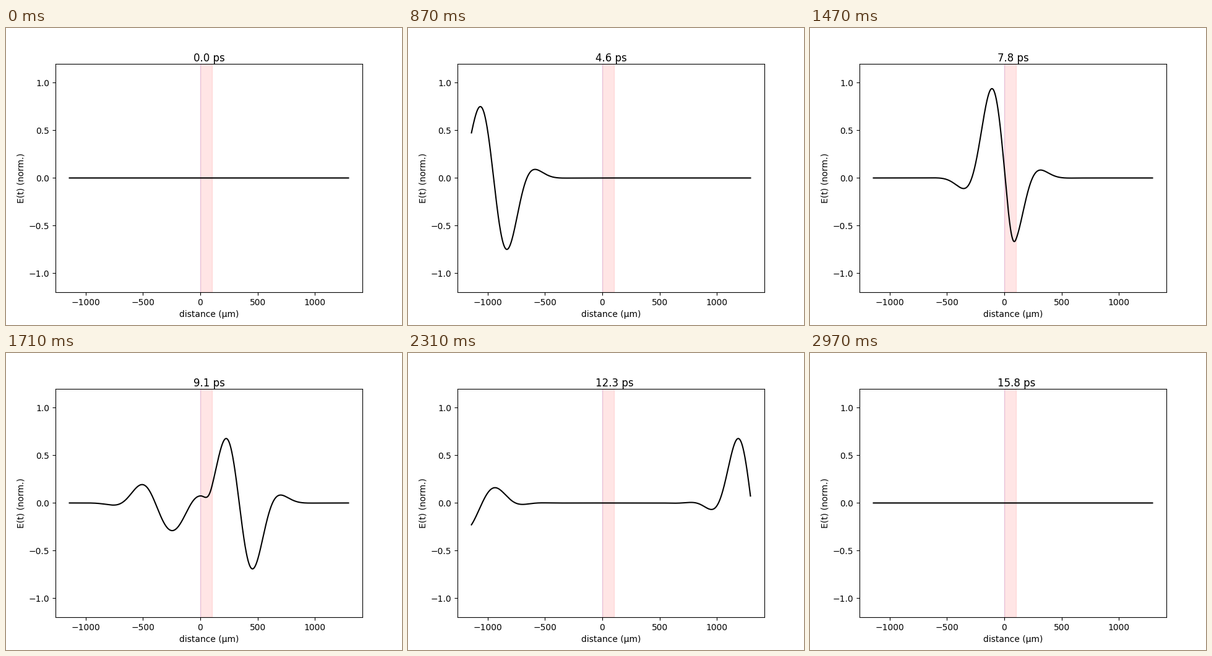
Recreate the animation shown at these times as a matplotlib script. Size 640 by 480 pixels, loop 3 s.

```python
import numpy as np
import matplotlib.pyplot as plt
from matplotlib.animation import FuncAnimation

FRAMES, INTERVAL = 100, 30
DT = 0.16                 # ps per frame
C = 299.79                # light speed, um/ps
START = -2338             # pulse centre at t = 0, um

# Pulse: amplitude, wavenumber, envelope width
AMP, K, WIDTH = 0.97, 0.01083, 180

# Slab with a thin conducting film on its front face
L, N, Y = 100, 1.57, 0.07
FRONT_R = (1 - N - Y) / (1 + N + Y)
FRONT_T = 2 / (1 + N + Y)
INNER_R = (N - 1 - Y) / (N + 1 + Y)
INNER_T = 2 * N / (N + 1 + Y)
BACK_R = (N - 1) / (N + 1)
BACK_T = 2 * N / (N + 1)
ECHOES = 4

x = np.linspace(-1140, 1291, 1216)


def pulse(u):
    return -AMP * np.sin(K * u) * np.exp(-u**2 / (2 * WIDTH**2))


def field(t):
    """Sum of the incident wave and all slab reflections at time t."""
    centre = START + C * t
    trip = 2 * N * L

    def wave(d):
        return pulse(d - centre)

    left = wave(x) + FRONT_R * wave(-x)
    inside = np.zeros_like(x)
    right = np.zeros_like(x)
    for m in range(ECHOES):
        gain = FRONT_T * (INNER_R * BACK_R)**m
        lag = m * trip
        left += gain * BACK_R * INNER_T * wave(lag + trip - x)
        inside += gain * (wave(N * x + lag) + BACK_R * wave(lag + trip - N * x))
        right += gain * BACK_T * wave(x - L + N * L + lag)
    return np.where(x < 0, left, np.where(x <= L, inside, right))


fig, ax = plt.subplots(figsize=(6.4, 4.8), dpi=100)
ax.axvspan(0, 1, color="blue", alpha=0.1)
ax.axvspan(0, L, color="red", alpha=0.1)
line, = ax.plot(x, field(0), color="black", lw=1.5)
clock = ax.text(0.45, 1.01, "", transform=ax.transAxes, fontsize=12)

margin = 0.05 * (x[-1] - x[0])
ax.set_xlim(x[0] - margin, x[-1] + margin)
ax.set_ylim(-1.2, 1.2)
ax.set_xlabel("distance (µm)")
ax.set_ylabel("E(t) (norm.)")


def update(i):
    t = i * DT
    line.set_ydata(field(t))
    clock.set_text(f"{t:.1f} ps")
    return line, clock


anim = FuncAnimation(fig, update, frames=FRAMES, interval=INTERVAL,
                     repeat=True, repeat_delay=0)
plt.show()
```
